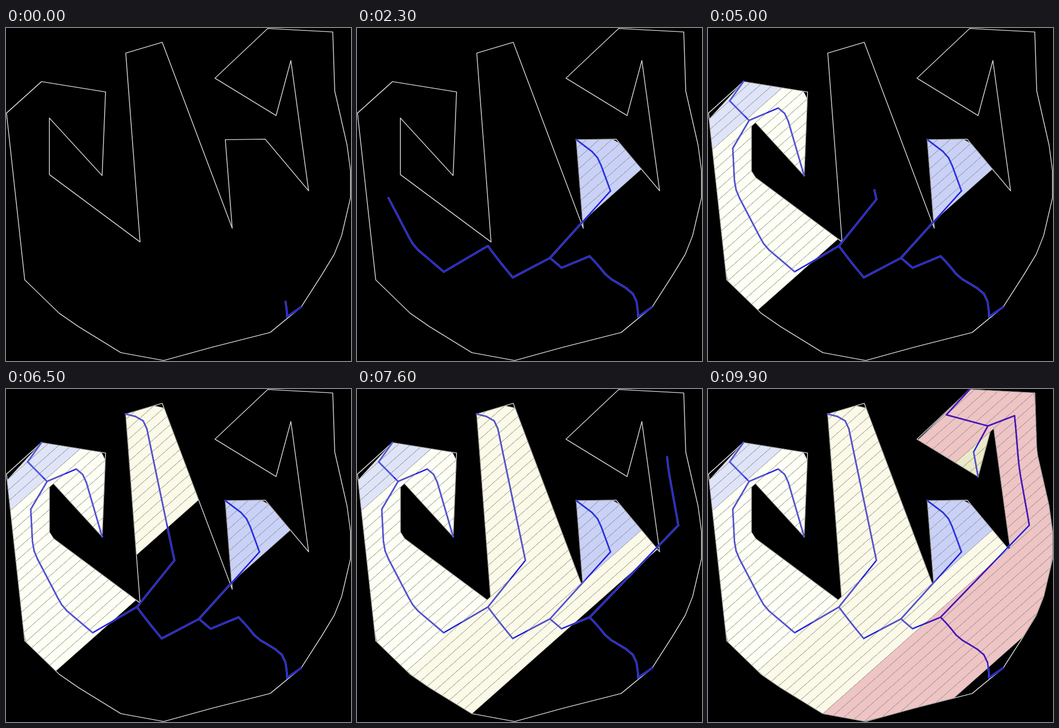
Write an HTML page with a canvas that moves like this. It is 700 px wide and 677 px high and loops after 10000 ms.

```html
<!DOCTYPE html>
<html lang="en">
<head>
<meta charset="utf-8">
<title>Polygon sweep</title>
<style>
html, body { margin: 0; height: 100%; overflow: hidden; background: #000; }
canvas { display: block; }
</style>
</head>
<body>
<canvas id="stage" width="700" height="677"></canvas>
<script>
const ctx = document.getElementById('stage').getContext('2d');
const outline = [
  [1, 173], [72, 109], [202, 130], [195, 300], [88, 183], [88, 298], [272, 435],
  [243, 51], [317, 29], [459, 407], [445, 227], [526, 226], [614, 331], [578, 66],
  [548, 178], [424, 102], [531, 1], [663, 8], [667, 128], [692, 238], [699, 290],
  [699, 345], [681, 422], [666, 460], [640, 503], [599, 567], [536, 619], [418, 649],
  [320, 676], [233, 660], [147, 607], [108, 580], [38, 512]
];
const ANGLE = 41.6 * Math.PI / 180, GAP = 16.95, FIRST = 817.95;
const level = ([x, y]) => x * Math.sin(ANGLE) + y * Math.cos(ANGLE);   // across the hatching
const along = ([x, y]) => x * Math.cos(ANGLE) - y * Math.sin(ANGLE);   // along the hatching
const mix = (p, q, t) => [p[0] + (q[0] - p[0]) * t, p[1] + (q[1] - p[1]) * t];
const mid = c => mix(c.a, c.b, 0.5);

// All chords of the outline at one level, left to right.
function chordsAt(s) {
  const hits = [];
  outline.forEach((p, i) => {
    const q = outline[(i + 1) % outline.length], a = level(p), b = level(q);
    if ((a - s) * (b - s) < 0) hits.push(mix(p, q, (s - a) / (b - a)));
  });
  hits.sort((p, q) => along(p) - along(q));
  const row = [];
  for (let i = 0; i + 1 < hits.length; i += 2)
    row.push({ s, a: hits[i], b: hits[i + 1], cells: [] });
  return row;
}

function touch(c, d) {
  const shared = Math.min(along(c.b), along(d.b)) - Math.max(along(c.a), along(d.a));
  const size = e => along(e.b) - along(e.a);
  return shared > 0.1 * Math.min(size(c), size(d));
}

// A cell joins one chord to one or two chords of the next row.
function addCell(whole, kids, tip) {
  const fork = kids.length > 1, chords = [whole, ...kids];
  const far = mix(kids[0].a, kids[kids.length - 1].b, 0.5);
  const point = tip ? far : mix(mid(whole), far, fork ? 0.3 : 0.5);
  const ring = [whole.a, whole.b, ...[...kids].reverse().flatMap(k => [k.b, k.a])];
  const cell = { chords, fork, tip, point, ring, exits: [] };
  chords.forEach(c => c.cells.push(cell));
  return cell;
}

const rows = [];
for (let s = FIRST; s > Math.min(...outline.map(level)); s -= GAP) rows.push(chordsAt(s));
rows.slice(1).forEach((next, i) => {
  const row = rows[i];
  row.forEach(c => {
    const kids = next.filter(d => touch(c, d));
    if (kids.length > 1 || kids.length && row.filter(e => touch(e, kids[0])).length < 2)
      addCell(c, kids);
  });
  next.forEach(d => {
    const kids = row.filter(c => touch(c, d));
    if (kids.length > 1) addCell(d, kids);
  });
});

// Close every open end with its outermost corner.
const ends = rows.flat().filter(c => c.cells.length === 1).map(c => {
  const dir = Math.sign(c.s - c.cells[0].chords.find(d => d.s !== c.s).s);
  const out = p => (level(p) - c.s) * dir;
  const tip = outline
    .filter(p => out(p) > 0 && out(p) < GAP && along(p) > along(c.a) - GAP && along(p) < along(c.b) + GAP)
    .reduce((m, p) => out(p) > out(m) ? p : m);
  return addCell({ s: level(tip), a: tip, b: tip, cells: [] }, [c], tip);
});

const styles = {
  blue: { fill: '#c9d1f7', line: '#2c34df' },
  sky: { fill: '#dfe4f8', line: '#5259dc' },
  ivory: { fill: '#fefff4', line: '#5555d2' },
  cream: { fill: '#fbf9e7', line: '#5555cc' },
  sand: { fill: '#ece9c8', line: '#5555cc' },
  red: { fill: '#eec4c4', line: '#4a18b4' }
};
// Branch colours and first turn at each fork, in the order of the walk.
const branches = 'red cream blue cream ivory sky ivory cream red red sand'.split(' ');
const turns = [...'LRLLR'];

// Depth-first walk: each cell is entered once and filled on the way back.
const events = [];
function walk(cell, entry, parent, style) {
  Object.assign(cell, { parent, style });
  events.push({ cell, back: false });
  const doors = cell.chords.filter(c => c !== entry);
  doors.sort((c, d) => along(mid(c)) - along(mid(d)));
  if (cell.fork && turns.shift() === 'R') doors.reverse();
  for (const door of doors) {
    const next = door.cells.find(c => c !== cell);
    if (!next) continue;
    cell.exits.push({ door, next });
    walk(next, door, cell, cell.fork ? styles[branches.shift()] : style);
  }
  events.push({ cell, back: true });
}
const start = ends.find(c => c.chords[1].s === FIRST);
walk(start, start.chords[0], null, styles[branches.shift()]);

function stroke(points, color, width) {
  ctx.beginPath();
  points.forEach(p => ctx.lineTo(...p));
  ctx.strokeStyle = color;
  ctx.lineWidth = width;
  ctx.stroke();
}

function fillCell({ ring, style }) {
  stroke([...ring, ring[0]], '#8e8e8c', 1);
  ctx.fillStyle = style.fill;
  ctx.fill();
  stroke([...ring, ring[0]], '#8e8e8c', 0.8);
}

// The trail reaches into a cell from the one before it.
function trail({ parent, point, tip }, color, width) {
  if (parent) stroke([parent.point, point], color, width);
  if (tip) stroke([point, tip], color, width);
}

// Filled cells tint the trail; at a fork only up to the door.
function tint({ exits, fork, point, tip, style }) {
  for (const { door, next } of exits) {
    const s = level(point), t = (door.s - s) / (level(next.point) - s);
    stroke([point, mix(point, next.point, fork ? t : 1)], style.line, 3);
  }
  if (tip) stroke([point, tip], style.line, 3);
}

const PER_STEP = (events.length - 4.6) / 99;

function draw(step) {
  const done = events.slice(0, Math.round(2.6 + step * PER_STEP));
  const entered = done.filter(e => !e.back).map(e => e.cell);
  const filled = done.filter(e => e.back).map(e => e.cell);
  ctx.clearRect(0, 0, 700, 677);
  ctx.lineJoin = ctx.lineCap = 'round';
  stroke([...outline, outline[0]], '#d0d0d0', 1.7);
  entered.forEach(c => trail(c, '#8686c8', 3.8));
  filled.forEach(fillCell);
  entered.forEach(c => trail(c, '#2020e0', 2.8));
  filled.forEach(tint);
}

function tick() {
  draw(Math.floor(performance.now() % 10000 / 100));
  requestAnimationFrame(tick);
}
tick();
</script>
</body>
</html>
```
